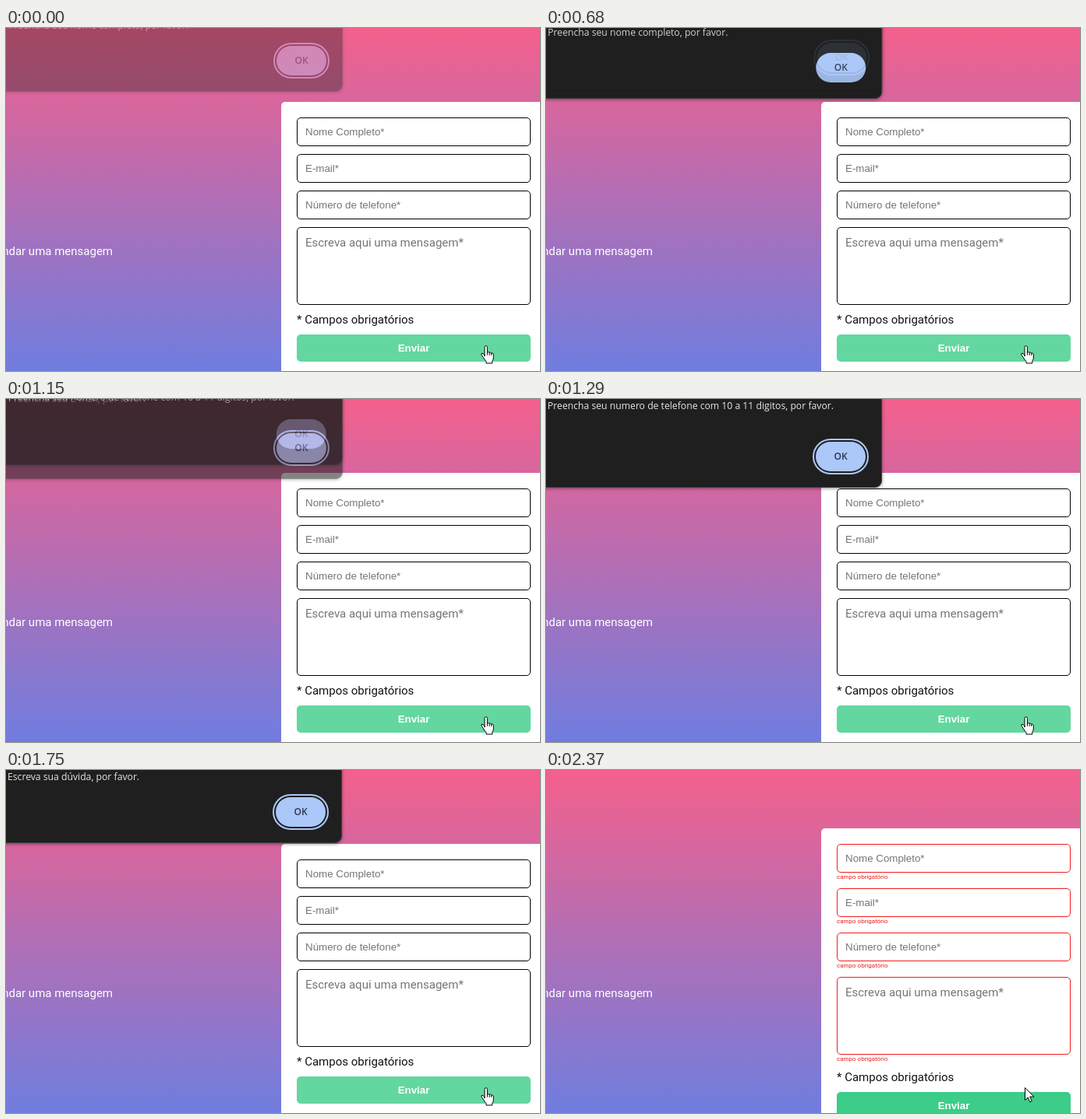
Write an HTML page that moves like this. It is 685 by 441 pixels and loops after 2430 ms.

```html
<!DOCTYPE html>
<html lang="pt-BR">
<head>
<meta charset="utf-8">
<title>Formulário de contato</title>
<style>
html, body { margin: 0; width: 100%; height: 100%; overflow: hidden; }
#stage {
  position: relative; width: 685px; height: 441px; overflow: hidden;
  background: linear-gradient(#f4608c, #6f7ddf);
}
svg { position: absolute; left: 0; top: 0; }
text { white-space: pre; }
.roboto { font: 15px Roboto, sans-serif; }
.arial { font: 13.333px "Liberation Sans", Arial, sans-serif; }
.hint { fill: #757575; }
.error { font: 8px Roboto, sans-serif; fill: #f01c1c; }
.dialog { position: absolute; left: 0; top: 0; }
.dialog * { position: absolute; box-sizing: border-box; white-space: nowrap; }
.box {
  left: -40px; top: -100px; width: 471px;
  background: #1f1f1f; border: 1px solid #3c3c3c; border-radius: 9px;
  box-shadow: 0 1px 4px rgba(0, 0, 0, .45);
}
.msg { left: 2px; top: 0; font: 12.2px/18px "Open Sans", "Noto Sans", sans-serif; color: #e6e6e6; }
.ok {
  left: 346px; width: 64px; height: 38px; border-radius: 19px;
  background: #abc8f9; color: #2b3650; text-align: center;
  font: 600 12px/38px "Open Sans", "Noto Sans", sans-serif;
}
.ring { left: 342px; width: 72px; height: 46px; border-radius: 23px; border: 2px solid #abc8f9; }
</style>
</head>
<body>
<div id="stage">
  <svg id="page" width="685" height="441" viewBox="0 0 685 441">
    <text class="roboto" x="137" y="292" text-anchor="end" fill="#fff">mandar uma mensagem</text>
    <g id="idle"></g>
    <g id="invalid"></g>
    <g id="hand" transform="translate(609 408)" stroke="#000" stroke-linejoin="round">
      <path fill="#fff" d="M5 14V2.4a1.7 1.7 0 0 1 3.4 0V9q1.4-1 2.7.3q1.5-.8 2.6.6q2.3-.3 2.6 1.9V16q0 2.5-1.5 4.2V23H7V20.6q-2.4-2.2-4-5.4l-2-3q-.6-2 1-2q1.4 0 3 2.6z"/>
      <path fill="none" d="M8.4 9v3.6M11.1 9.3v3.6M13.7 9.9v3"/>
    </g>
    <path id="arrow" fill="#fff" stroke="#000" d="M614.5 408.5v16l3.7-3.5 2.5 5.8 2.5-1.1-2.5-5.6h5.2z"/>
  </svg>
</div>
<script>
const LOOP = 2430, INVALID_AT = 2160;
const el = id => document.getElementById(id);

const label = (cls, x, y, str, extra = '') =>
  `<text class="${cls}" x="${x}" y="${y}" ${extra}>${str}</text>`;

function form(top, step, line, invalid) {
  const fields = ['Nome Completo*', 'E-mail*', 'Número de telefone*', 'Escreva aqui uma mensagem*'];
  let out = `<rect x="353" y="${top - 20}" width="352" height="500" rx="5" fill="#fff"/>`;
  fields.forEach((name, i) => {
    const y = top + i * step, area = i === 3, h = area ? 100 : 37;
    out += `<rect x="373.5" y="${y + .5}" width="299" height="${h - 1}" rx="4.5" fill="#fff" stroke="${line}"/>`;
    out += label((area ? 'roboto' : 'arial') + ' hint', 384, y + (area ? 25 : 23), name);
    if (invalid) out += label('error', 373, y + h + 8, 'campo obrigatório');
  });
  const end = top + 3 * step + 100 + (invalid ? 10 : 0);
  out += label('roboto', 373, end + (invalid ? 24 : 24), '* Campos obrigatórios', 'fill="#111"');
  const y = end + 38;
  out += `<g opacity="${invalid ? 1 : .8}"><rect x="373" y="${y}" width="300" height="35" rx="5" fill="#3ccd88"/></g>`;
  out += label('arial', 523, y + 22, 'Enviar', 'text-anchor="middle" fill="#fff" font-weight="700" style="font-weight:700"');
  return out;
}
el('idle').innerHTML = form(115, 47, '#000');
el('invalid').innerHTML = form(95, 57, '#f01c1c', true);

// steps: [time, vertical shift, opacity, focus ring]
const dialogs = [
  { text: 'Preencha seu nome completo, por favor.', bottom: 94, steps: [
    [0, -12, .37, 1], [60, -2, 1, 1], [130, 0, 1, 1],
    [680, -3, 1, 0], [750, -9, .65, 0], [820, 0, 0, 0]] },
  { text: 'Preencha seu E-mail, por favor.', bottom: 94, steps: [
    [680, -16, .1, 1], [750, -11, .55, 1], [820, -2, 1, 1], [880, 0, 1, 1],
    [1080, -3, 1, 0], [1150, -9, .65, 0], [1220, 0, 0, 0]] },
  { text: 'Preencha seu numero de telefone com 10 a 11 digitos, por favor.', bottom: 114, steps: [
    [1080, -16, .1, 1], [1150, -11, .55, 1], [1220, -2, 1, 1], [1290, 0, 1, 1],
    [1550, -3, 1, 0], [1620, -9, .65, 0], [1690, 0, 0, 0]] },
  { text: 'Escreva sua dúvida, por favor.', bottom: 94, steps: [
    [1550, -16, .1, 1], [1620, -10.5, .55, 1], [1690, -2, 1, 1], [1750, 0, 1, 1],
    [2160, 0, 1, 0], [2230, -3, .95, 0], [2300, -9, .55, 0], [2370, 0, 0, 0]] }
];

for (const d of dialogs) {
  d.node = document.createElement('div');
  d.node.className = 'dialog';
  d.node.innerHTML =
    `<div class="box" style="height:${d.bottom + 100}px"></div>` +
    `<div class="msg">${d.text}</div>` +
    `<div class="ok" style="top:${d.bottom - 59}px">OK</div>` +
    `<div class="ring" style="top:${d.bottom - 63}px"></div>`;
  d.ring = d.node.querySelector('.ring');
  el('stage').append(d.node);
}

const show = (node, on) => { node.style.display = on ? '' : 'none'; };

function draw(t) {
  const invalid = t >= INVALID_AT;
  show(el('idle'), !invalid);
  show(el('hand'), !invalid);
  show(el('invalid'), invalid);
  show(el('arrow'), invalid);
  for (const d of dialogs) {
    const step = d.steps.filter(s => s[0] <= t).pop();
    const visible = step && step[2] > 0;
    show(d.node, visible);
    if (!visible) continue;
    const [, dy, opacity, ring] = step;
    d.node.style.transform = `translate(${-dy / 12}px, ${dy}px)`;
    d.node.style.opacity = opacity;
    show(d.ring, ring);
  }
}

const start = performance.now();
function tick() {
  draw((performance.now() - start) % LOOP);
  requestAnimationFrame(tick);
}
tick();
</script>
</body>
</html>
```
